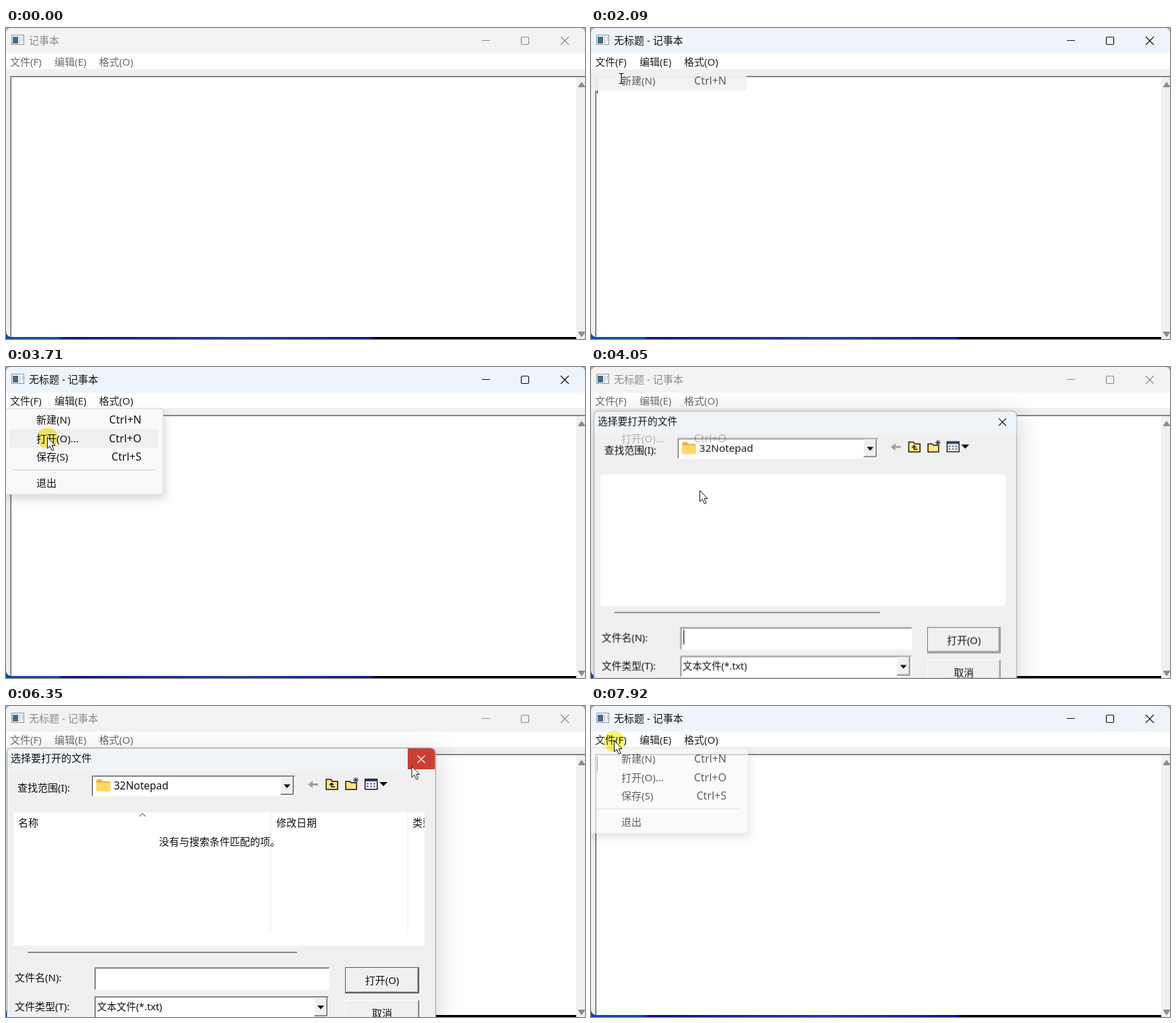
Recreate the animation shown at these times as an HTML page. Size 859 by 462 pixels, loop 7.99 s.

```html
<!DOCTYPE html>
<html lang="zh-CN">
<head>
<meta charset="utf-8">
<title>记事本</title>
<style>
  html, body { margin: 0; width: 100%; height: 100%; overflow: hidden; background: #fff; }
  svg { display: block; width: 100vw; height: 100vh; }
  text { font: 15px "Noto Sans", "Noto Sans CJK SC", "Noto Sans CJK", sans-serif; fill: currentColor; white-space: pre; }
  .end { text-anchor: end; font-size: 16px; }
  .mid { text-anchor: middle; }
  .line { fill: none; stroke: currentColor; stroke-width: 1.2; }
  .soft, .dark, .lit { fill: none; stroke: #a0a0a0; }
  .dark { stroke: #696969; }
  .lit { stroke: #fff; }
  .face { fill: #f0f0f0; }
  .white { fill: #fff; }
  #dialog { transform-origin: 214px 276px; }
  #click { mix-blend-mode: multiply; }
  .blink { animation: blink 998.75ms -241ms step-end infinite; }
  @keyframes blink { 50% { opacity: 0; } }
</style>
</head>
<body>
<svg viewBox="0 0 859 462" preserveAspectRatio="none" color="#111">
  <defs>
    <linearGradient id="desk">
      <stop offset=".09" stop-color="#0d4aa8"/><stop offset=".1" stop-color="#0e0e80"/>
      <stop offset=".4" stop-color="#1c3c98"/><stop offset=".63" stop-color="#0c1488"/>
      <stop offset=".64" stop-color="#000010"/>
    </linearGradient>
    <filter id="shadow" x="-10%" y="-10%" width="125%" height="130%">
      <feDropShadow dx="3" dy="7" stdDeviation="6" flood-opacity=".14"/>
    </filter>
    <filter id="deep" x="-10%" y="-10%" width="125%" height="125%">
      <feDropShadow dx="4" dy="5" stdDeviation="18" flood-opacity=".15"/>
    </filter>
    <clipPath id="frame"><rect width="859" height="459" rx="8"/></clipPath>
    <clipPath id="list"><rect x="11" y="158" width="610" height="198"/></clipPath>
  </defs>

  <rect width="859" height="462" fill="#a9afbc"/>
  <rect y="440" width="859" height="22" fill="url(#desk)"/>

  <g clip-path="url(#frame)">
    <rect class="face" width="859" height="459"/>
    <rect id="bar" width="859" height="38"/>
    <rect class="white" y="38" width="859" height="23"/>
    <g class="field" data-box="6 71 900 420"/></g>
    <rect class="face" x="846" y="73" width="13" height="390"/>
    <g fill="#8b8b8f" stroke="#8b8b8f" stroke-width="2" stroke-linejoin="round">
      <path d="M850 87L854 81.5L858 87Z"/>
      <path d="M850 452L854 458L858 452Z"/>
    </g>

    <rect x="8.5" y="10.5" width="18" height="14" fill="#f4f6f8" stroke="#87919b"/>
    <rect x="10" y="13" width="8" height="10" fill="#3f6c8d"/>
    <path d="M20.5 13V23M24.5 13V20" stroke="#a9b6c1"/>

    <g id="chrome">
      <text id="plainTitle" x="34" y="23.5">记事本</text>
      <text id="newTitle" x="34" y="23.5">无标题 - 记事本</text>
      <path class="line" d="M706 18.5H718M823 13L835 25M835 13L823 25"/>
      <rect class="line" x="764.5" y="13.5" width="11" height="11" rx="1.5"/>
    </g>
    <g id="menuBar">
      <text x="6" y="55.5">文件(F)</text>
      <text x="72" y="55.5">编辑(E)</text>
      <text x="138" y="55.5">格式(O)</text>
    </g>
    <g id="caret"><path class="line blink" d="M9.5 75V97"/></g>
  </g>

  <g id="menu">
    <path d="M-4 62H229Q233 62 233 66V185Q233 189 229 189H-4Z" fill="#f9f9f9" stroke="#dcdcdc" filter="url(#shadow)"/>
    <rect id="hoverNew" x="5" y="65" width="221" height="27" rx="3" fill="#f0f0f0"/>
    <rect id="hoverOpen" x="5" y="92" width="221" height="28" rx="3" fill="#f0f0f0"/>
    <g id="itemNew"><text x="45" y="83.5">新建(N)</text><text class="end" x="201" y="83.5">Ctrl+N</text></g>
    <g id="itemOpen"><text x="45" y="111.5">打开(O)...</text><text class="end" x="201" y="111.5">Ctrl+O</text></g>
    <text x="45" y="139">保存(S)</text><text class="end" x="201" y="139">Ctrl+S</text>
    <path d="M9 153H222" stroke="#d9d9d9" stroke-width="1.5"/>
    <text x="45" y="177.5">退出</text>
  </g>

  <g id="dialog">
    <path d="M1.5 480V70Q1.5 62.5 9 62.5H629Q637.5 62.5 637.5 70V480Z" fill="#f0f0f0" stroke="#9a9a9a" filter="url(#deep)"/>
    <path d="M2 97V70Q2 63 9 63H629Q637 63 637 70V97Z" fill="#eff4f9"/>
    <path id="closeHot" d="M596 63H629Q636.5 63 636.5 70V94H596Z" fill="#c94032"/>
    <path id="closeX" class="line" d="M610.5 73.5L621.5 84.5M621.5 73.5L610.5 84.5"/>
    <text x="7" y="83">选择要打开的文件</text>

    <text x="17" y="127">查找范围(I):</text>
    <g class="field" data-box="127 103 302 31" data-drop></g>
    <path d="M134 111Q134 109 136 109H141L144 112H153Q155 112 155 114V125Q155 127 153 127H136Q134 127 134 125Z" fill="#e9b23c"/>
    <rect x="134" y="114" width="21" height="13" rx="1.5" fill="#ffd968"/>
    <text x="160" y="123.5" style="font-size:15.5px">32Notepad</text>

    <path d="M448 116.5L455 111V115H463V118H455V122Z" fill="#a0a0a0"/>
    <g fill="#ffe680" stroke="#111" stroke-width="1.5">
      <path d="M475 124V109H482L484 112H492V124Z"/>
      <path d="M504 124V112H510L512 114H520V124Z"/>
      <path fill="none" d="M488 120H483V115M480 117.5L483 114.5L486 117.5"/>
      <path fill="none" stroke-width="1" d="M519 106V114M515 110H523M516 107L522 113M522 107L516 113"/>
    </g>
    <rect x="532.7" y="108.7" width="18" height="15" fill="#fff" stroke="#111" stroke-width="1.5"/>
    <path d="M533 110.5H551" stroke="#28406e" stroke-width="3"/>
    <path d="M535 115.5H549M535 119.5H549" stroke="#4b5f86" stroke-width="2" stroke-dasharray="3 2"/>
    <path d="M554 113H566L560 119Z"/>

    <rect class="white" x="11" y="158" width="610" height="198"/>
    <g id="files" clip-path="url(#list)">
      <path d="M392.5 158V335M596 158V335" stroke="#ececec"/>
      <path class="line" d="M198 164L202.5 159.5L207 164" color="#777"/>
      <text x="18" y="178.5">名称</text>
      <text x="401" y="178.5">修改日期</text>
      <text x="603" y="178.5">类型</text>
      <text x="227" y="207">没有与搜索条件匹配的项。</text>
    </g>
    <path d="M33 366H431" stroke="#898989" stroke-width="2" stroke-linecap="round"/>
    <path id="scrollEnds" d="M24 363V370L18 366.5ZM608 363V370L614 366.5Z" fill="#a8a8a8"/>

    <text x="13" y="409">文件名(N):</text>
    <g class="field" data-box="131 388 349 34"></g>
    <g id="nameCaret"><path class="line blink" d="M136.7 392V414"/></g>

    <text x="13" y="452">文件类型(T):</text>
    <g class="field" data-box="131 431 348 32" data-drop></g>
    <text x="135" y="452" style="font-size:14.5px">文本文件(*.txt)</text>

    <rect class="face" x="503.5" y="388.5" width="109" height="38" stroke="#555"/>
    <g class="button" data-box="504 389 108 37"></g>
    <text class="mid" x="558" y="413">打开(O)</text>
    <g class="button" data-box="503 437 110 39"></g>
    <text class="mid" x="558" y="462">取消</text>
  </g>

  <g id="pickedNew">
    <rect x="6" y="69" width="225" height="24" fill="#f2f2f2" opacity=".93"/>
    <use href="#itemNew" opacity=".66"/>
  </g>
  <use id="pickedOpen" href="#itemOpen"/>

  <g id="pointer">
    <circle id="click" cx=".5" cy="1.5" r="15.5" fill="#fbf26a"/>
    <path id="arrow" d="M.5 .5V17L4.3 13.4L7.2 20.2L10 19L7.1 12.5H12Z" fill="#fff" stroke="#111"/>
    <path id="beam" class="line" d="M-3.5 -7.5H-1L0 -6.5L1 -7.5H3.5M0 -6.5V6.5M-3.5 7.5H-1L0 6.5L1 7.5H3.5"/>
  </g>
</svg>
<script>
const LOOP = 7990;

// Bevelled controls
const topLeft = (cls, x, y, w, h) => `<path class="${cls}" d="M${x + .5} ${y + h}V${y + .5}H${x + w}"/>`;
const bottomRight = (cls, x, y, w, h) => `<path class="${cls}" d="M${x} ${y + h - .5}H${x + w - .5}V${y}"/>`;

const raised = (x, y, w, h) =>
  `<rect class="face" x="${x}" y="${y}" width="${w}" height="${h}"/>` +
  topLeft('lit', x, y, w, h) + bottomRight('soft', x + 1, y + 1, w - 2, h - 2) + bottomRight('dark', x, y, w, h);

const sunken = (x, y, w, h) =>
  `<rect class="white" x="${x}" y="${y}" width="${w}" height="${h}"/>` +
  topLeft('soft', x, y, w, h) + topLeft('dark', x + 1, y + 1, w - 2, h - 2);

const dropButton = (x, y, w, h) =>
  raised(x + w - 22, y + 2, 20, h - 4) +
  `<path d="M${x + w - 17} ${y + h / 2 - 2}h10l-5 5.5z"/>`;

for (const el of document.querySelectorAll('[data-box]')) {
  const box = el.dataset.box.split(' ').map(Number);
  el.innerHTML = el.matches('.button') ? raised(...box) : sunken(...box);
  if ('drop' in el.dataset) el.innerHTML += dropButton(...box);
}

// Writes one looping keyframe rule; points are [milliseconds, value].
const sheet = document.head.appendChild(document.createElement('style'));
function track(id, prop, points, timing = 'linear') {
  const name = `${id}-${prop}`;
  const steps = [[0, points[0][1]], ...points, [LOOP, points.at(-1)[1]]]
    .map(([ms, value]) => `${(ms / LOOP * 100).toFixed(3)}%{${prop}:${value}}`);
  sheet.textContent += `@keyframes ${name}{${steps.join('')}}`;
  const el = document.getElementById(id);
  el.style.animation = [el.style.animation, `${name} ${LOOP}ms ${timing} infinite`].filter(Boolean).join();
}

// Alternates between two values at the given times.
const toggle = (id, prop, [first, second], ...times) =>
  track(id, prop, [0, ...times].map((ms, i) => [ms, i % 2 ? second : first]), 'step-end');
const show = (id, ...times) => toggle(id, 'opacity', [0, 1], ...times);
const hide = (id, ...times) => toggle(id, 'opacity', [1, 0], ...times);

// Fades in and out over each [start, end] span.
const fade = (id, ramp, ...spans) => track(id, 'opacity', spans.flatMap(([start, end]) =>
  [[start, 0], [start + ramp, 1], [end, 1], [end + ramp, 0]]).filter(([ms]) => ms <= LOOP));

const clicks = {
  file: [1020, 1090], pickNew: [1960, 2030], fileAgain: [2570, 2640],
  pickOpen: [3580, 3840], close: [6480, 6550], fileLast: [7790, LOOP],
};
const { file, pickNew, fileAgain, pickOpen, close, fileLast } = clicks;
const dialogOpen = 3960, dialogReady = 4120, closeHover = 6300;
show('click', ...Object.values(clicks).flat());

// Window
const focus = [file[0], pickOpen[1] + 60, close[1] + 50];
toggle('bar', 'fill', ['#f3f3f3', '#eef4f9'], ...focus);
toggle('chrome', 'color', ['#898989', '#111'], ...focus);
toggle('menuBar', 'color', ['#6c6c6c', '#222'], ...focus);
hide('plainTitle', pickNew[1]);
show('newTitle', pickNew[1]);
show('caret', pickNew[1], pickOpen[1], focus[2]);

// File menu
fade('menu', 80, [file[1], pickNew[0]], [fileAgain[1], pickOpen[1]], [fileLast[0] + 78, LOOP]);
show('hoverNew', 1430, 2060, 2950, 3260);
show('hoverOpen', 3260, dialogOpen);
fade('pickedNew', 70, [pickNew[0], 2150]);
fade('pickedOpen', 70, [pickOpen[1], 4000]);

// Open dialog
fade('dialog', 90, [dialogOpen, close[1]]);
toggle('dialog', 'transform', ['scale(.986)', 'none'], dialogReady, close[1]);
show('files', dialogReady + 60);
show('nameCaret', dialogOpen);
fade('scrollEnds', 70, [4700, 5100]);
show('closeHot', closeHover);
toggle('closeX', 'color', ['#111', '#fff'], closeHover);

// Pointer: each move has a start, an end and a destination.
const moves = [
  [130, 890, 30, 53], [1290, 1690, 45, 75], [2160, 2560, 34, 51], [2780, 3520, 61, 104],
  [3840, 4050, 161, 183], [4120, 5080, 195, 404], [5210, 5480, 200, 422],
  [5680, 6350, 601.5, 89], [6620, 7300, 34, 51],
];
const at = (x, y) => `translate(${x}px,${y}px)`;
let place = at(690, 480);
const path = moves.flatMap(([start, end, x, y]) => {
  const from = place;
  place = at(x, y);
  return [[start, from], [end, place]];
});
track('pointer', 'transform', path, 'cubic-bezier(.35,.1,.35,1)');

const overText = [130, 700, 2030, 2330, 4900, 5860, 6690, 7050];
show('beam', ...overText);
hide('arrow', ...overText);
</script>
</body>
</html>
```
